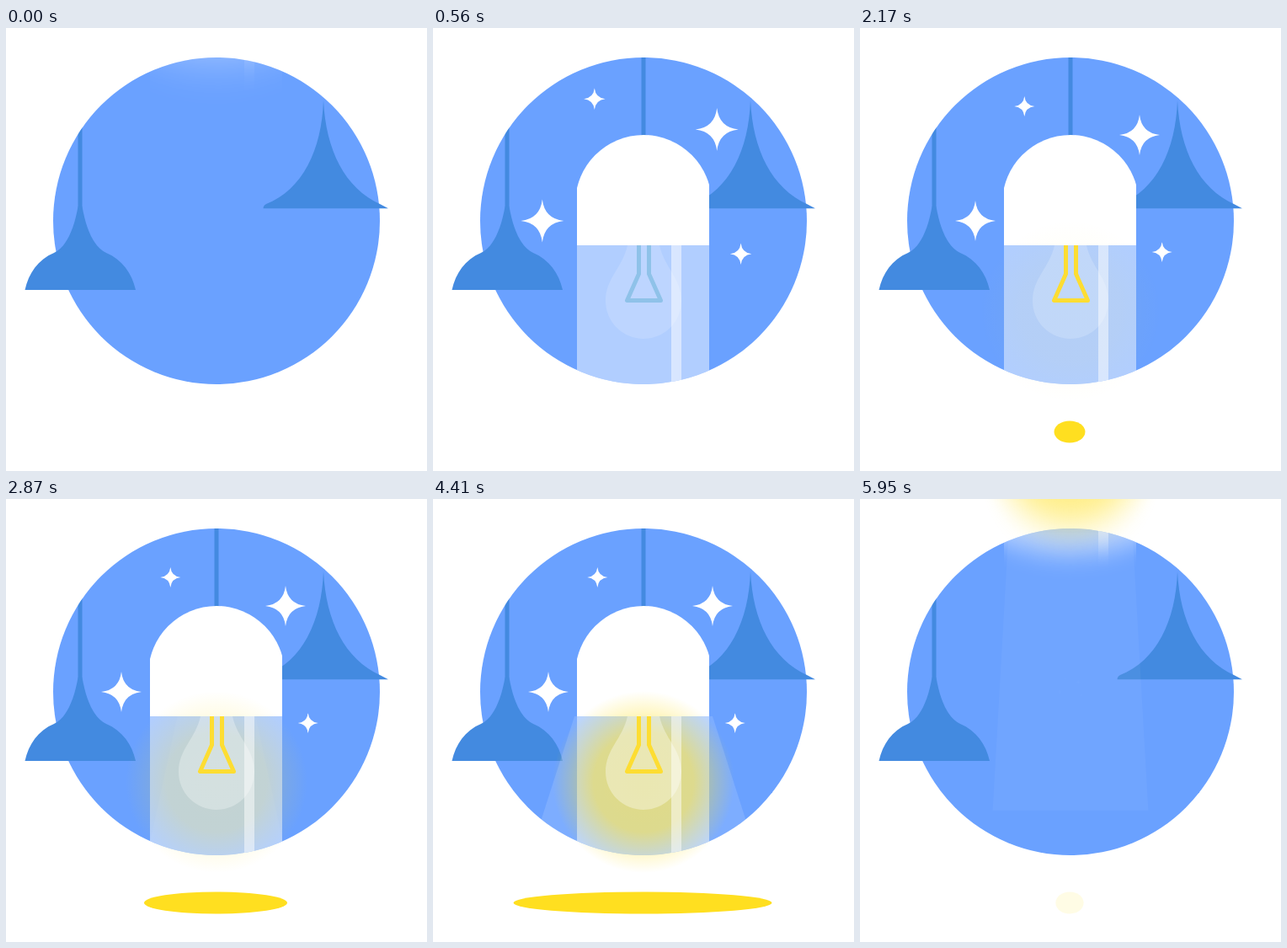
Write an HTML page that moves like this. It is 500x526 px and loops after 6020 ms.

```html
<!DOCTYPE html>
<html lang="en">
<head>
<meta charset="utf-8">
<title>Lamp</title>
<style>
  html, body { margin: 0; width: 100%; height: 100%; overflow: hidden; background: #fff; }
  svg { display: block; width: 100%; height: 100%; }
</style>
</head>
<body>
<svg viewBox="0 0 500 526">
  <defs>
    <clipPath id="disc"><circle cx="250" cy="229" r="194"/></clipPath>
    <clipPath id="shadeSides"><rect x="171" y="100" width="157" height="158"/></clipPath>
    <filter id="speed" filterUnits="userSpaceOnUse" x="0" y="-150" width="500" height="826" color-interpolation-filters="sRGB">
      <feGaussianBlur id="blur" stdDeviation="0 0"/>
    </filter>
    <radialGradient id="halo">
      <stop offset="0" stop-color="#ffdf1e"/>
      <stop offset=".55" stop-color="#ffdf1e" stop-opacity=".95"/>
      <stop offset=".8" stop-color="#ffdf1e" stop-opacity=".4"/>
      <stop offset="1" stop-color="#ffdf1e" stop-opacity="0"/>
    </radialGradient>
  </defs>

  <circle cx="250" cy="229" r="194" fill="#6aa1ff"/>
  <g fill="#438ae0">
    <rect x="85.5" y="100" width="5" height="113" clip-path="url(#disc)"/>
    <path d="M85.5 212C81 238 72 260 57 267C38 275 27 291 22.5 311H154C149.5 291 138 275 119 267C104 260 95 238 90.5 212Z"/>
    <path d="M377 86C375 145 352 192 309 209Q305.5 211 305.5 214.3H454L445 209.5C402 190 380 145 377 86Z"/>
  </g>

  <ellipse id="pool" cx="249" cy="479.5" ry="13" fill="#ffdf20"/>
  <path id="stars" fill="#fff"/>

  <g clip-path="url(#disc)">
    <path id="cone" fill="#fff"/>
    <g class="fast"><g class="lamp">
      <rect x="247.5" y="-400" width="5" height="530" fill="#438ae0"/>
      <path d="M171 258H328V440Q250 470 171 440Z" fill="#fff" fill-opacity=".48"/>
      <circle cx="250" cy="208" r="81" fill="#fff" clip-path="url(#shadeSides)"/>
      <path d="M171 205H328V258H171Z" fill="#fff"/>
    </g></g>
  </g>

  <g class="fast"><g class="lamp">
    <circle id="glow" cx="250" cy="336" r="108" fill="url(#halo)"/>
  </g></g>

  <g clip-path="url(#disc)">
    <g class="fast"><g class="lamp">
      <path id="bulb" d="M231 258H269C275 285 295 297 295 324A45 45 0 0 1 205 324C205 297 225 285 231 258Z" fill="#fff"/>
      <path id="filament" d="M244.5 258V292L230.5 323.5H270.5L256.5 292V258" fill="none" stroke-width="5" stroke-linejoin="round"/>
      <path d="M283 258H295V440H283Z" fill="#fff" fill-opacity=".5"/>
    </g></g>
  </g>
</svg>
<script>
const LOOP = 6020, DROP = 400, STARS_IN = 400, EXIT = 5600, SWING = 360;
const $ = id => document.getElementById(id);
const set = (el, attrs) => { for (const k in attrs) el.setAttribute(k, attrs[k]); };
const clamp = v => Math.max(0, Math.min(1, v));
const mix = (a, b, k) => a + (b - a) * k;
const backIn = k => k * k * (2.70158 * k - 1.70158);

// Piecewise curve through [time, value] knots.
function curve(knots, t, ease = k => k) {
  if (t <= knots[0][0]) return knots[0][1];
  for (let i = 1; i < knots.length; i++) {
    const [t0, v0] = knots[i - 1], [t1, v1] = knots[i];
    if (t <= t1) return mix(v0, v1, ease((t - t0) / (t1 - t0)));
  }
  return knots[knots.length - 1][1];
}
const smooth = k => k * k * (3 - 2 * k);

const POOL = [[2030, 0], [2520, 184], [2870, 170], [3150, 208], [3710, 280], [3850, 302], [4200, 340], [4480, 301], [4550, 293]];
const LIGHT = [[2000, 0], [2870, .2], [3710, .42], [4550, .55]];
const CONE = [[2500, 0], [3710, .11], [4550, .13]];

const star = (x, y, r) => {
  const c = r * .1;
  return `M${x} ${y - r}Q${x + c} ${y - c} ${x + r} ${y}Q${x + c} ${y + c} ${x} ${y + r}` +
    `Q${x - c} ${y + c} ${x - r} ${y}Q${x - c} ${y - c} ${x} ${y - r}Z`;
};
$('stars').setAttribute('d', star(137, 229, 24) + star(332, 127, 24) + star(195.3, 93, 12) + star(358.7, 266, 12));

const moving = document.querySelectorAll('.lamp');
const blurred = document.querySelectorAll('.fast');

function draw(t) {
  const out = clamp((t - EXIT) / SWING);
  const shrink = 1 - backIn(out);
  const gone = out >= 1;

  // Lamp travel and vertical motion blur.
  const rest = 1 - clamp(t / DROP);
  const lift = out ** 4;
  const y = -430 * (rest ** 4 + lift);
  const sigma = 30 * rest + 16 * lift;
  $('blur').setAttribute('stdDeviation', `0 ${sigma.toFixed(2)}`);
  moving.forEach(el => el.setAttribute('transform', `translate(0 ${y.toFixed(2)})`));
  blurred.forEach(el => sigma > .2 ? el.setAttribute('filter', 'url(#speed)') : el.removeAttribute('filter'));

  // Stars pop out of the middle and fall back into it.
  const pop = 1 - backIn(1 - clamp((t - STARS_IN) / SWING));
  const size = pop * shrink;
  set($('stars'), {
    transform: `translate(250 229) scale(${size}) translate(-250 -229)`,
    opacity: t < STARS_IN ? 0 : 1 - out
  });

  // Filament, bulb and halo.
  const warm = clamp((t - 1365) / 665);
  const rgb = [[143, 253], [194, 221], [233, 50]].map(([a, b]) => Math.round(mix(a, b, warm)));
  $('filament').setAttribute('stroke', `rgb(${rgb})`);
  const light = curve(LIGHT, t);
  $('glow').setAttribute('opacity', gone ? 0 : light);
  $('bulb').setAttribute('opacity', .15 + .2 * clamp(light / .3));

  // Pool on the floor and the cone above it.
  const width = curve(POOL, t, smooth);
  set($('pool'), { rx: Math.max(0, width * shrink / 2), opacity: gone ? 0 : clamp(shrink) });
  const top = Math.min(82, 80 * width / 293);
  const base = 153 * Math.min(1, width / 275);
  const topY = 258 - 241 * lift;
  const half = mix(base, 86, lift), topHalf = mix(top, 73, lift), baseY = mix(479, 358, lift);
  set($('cone'), {
    d: `M${250 - topHalf} ${topY}H${250 + topHalf}L${250 + half} ${baseY}H${250 - half}Z`,
    opacity: gone ? 0 : curve(CONE, t) * (1 - .7 * out)
  });
}

function tick() {
  draw(performance.now() % LOOP);
  requestAnimationFrame(tick);
}
tick();
</script>
</body>
</html>
```
